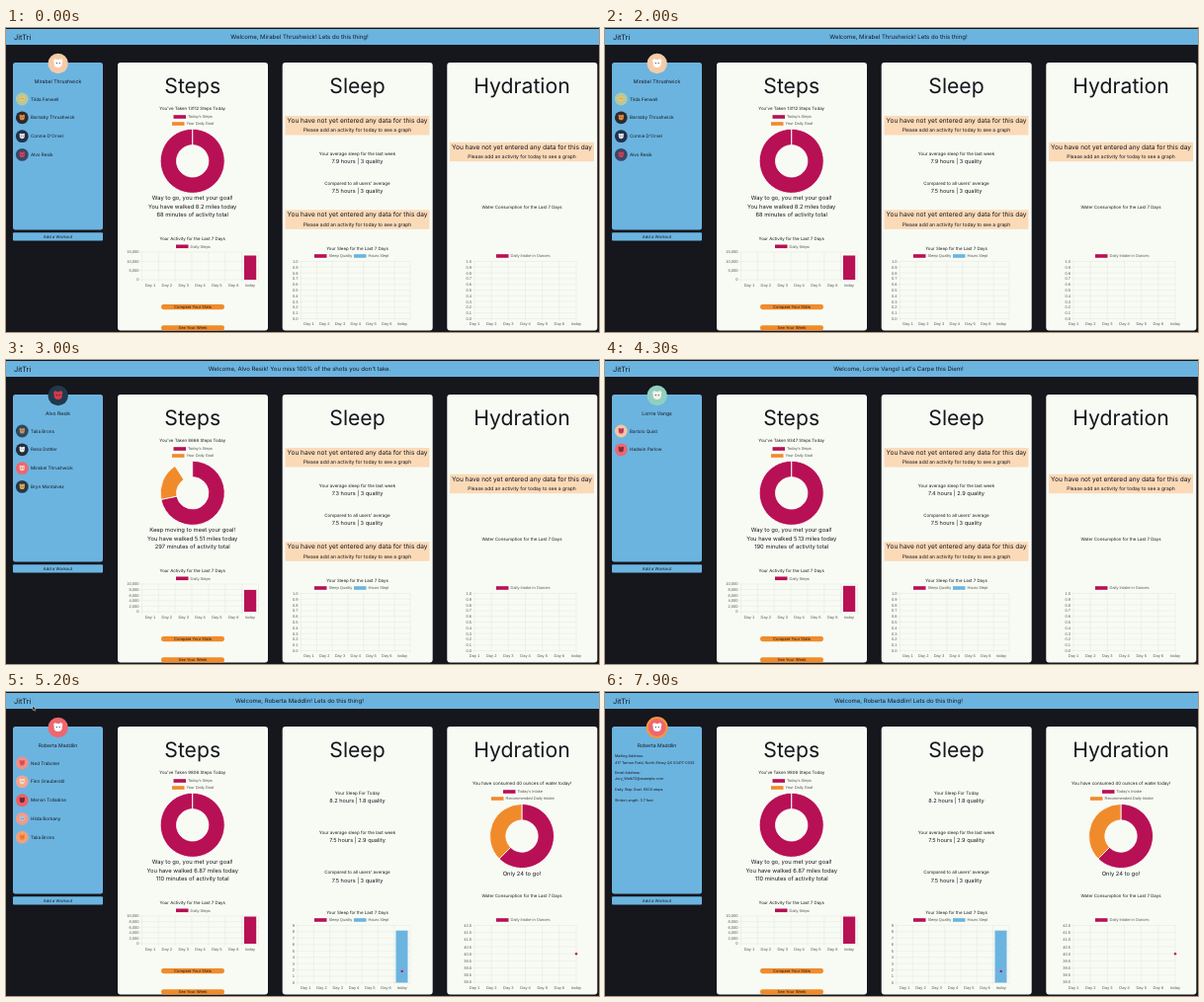
An HTML page that plays this animation: 600x308 px, repeating every 8000 ms.

```html
<!DOCTYPE html>
<html lang="en">
<head>
<meta charset="utf-8">
<title>Activity dashboard</title>
<style>
  html, body { margin: 0; width: 100%; height: 100%; overflow: hidden; background: #16161d; }
  svg { display: block; width: 100vw; height: 100vh; }
  text { font-family: Inter, Roboto, sans-serif; fill: #16161d; text-rendering: geometricPrecision; white-space: pre; }
  .chart { font-family: "Liberation Sans", Arial, sans-serif; fill: #555; }
</style>
</head>
<body>
<svg id="stage" viewBox="0 0 600 308"></svg>
<script>
const LOOP = 8000, CHART_MS = 1000;
const BLUE = '#6bb4e0', PINK = '#b81055', ORANGE = '#f08b2b', PAPER = '#f8fbf4',
      PEACH = '#fbdab8', GRID = '#e3e6df', DARK = '#16161d', CORAL = '#ef6670';
const DAYS = ['Day 1', 'Day 2', 'Day 3', 'Day 4', 'Day 5', 'Day 6', 'today'];
const NO_DATA = 'You have not yet entered any data for this day';
const ADD_DATA = 'Please add an activity for today to see a graph';
const PRAISE = 'Way to go, you met your goal!';

const users = [
  { at: -CHART_MS, name: 'Mirabel Thrushwick', quote: 'Lets do this thing!', face: ['#f5cba8', '#fff'],
    friends: [['Tilda Fenwell', '#b5c9a0', '#e9c46a'], ['Barnaby Thrushwick', '#2b2a30', '#e08a3c'],
              ["Connie D'Orvel", '#22304a', '#d8dfe8'], ['Alvo Resik', '#3a4766', '#d0405c']],
    steps: 13112, top: 15000, tick: 5000, share: 1, note: PRAISE, miles: '8.2', mins: 68, week: '7.9 hours | 3 quality' },
  { at: 2550, name: 'Alvo Resik', quote: "You miss 100% of the shots you don't take.", face: ['#21394c', '#d23b4c'],
    friends: [['Talia Brons', '#2c4a5e', '#c98d62'], ['Rena Dottler', '#23303e', '#f0f0ee'],
              ['Mirabel Thrushwick', CORAL, '#f8c9b4'], ['Bryn Montalvez', '#263848', '#e0a84c']],
    steps: 8666, top: 10000, tick: 2000, share: .79, note: 'Keep moving to meet your goal!', miles: '5.51', mins: 297, week: '7.3 hours | 3 quality' },
  { at: 3400, name: 'Lorrie Vangs', quote: "Let's Carpe this Diem!", face: ['#8fd0c2', '#f6f1e6'],
    friends: [['Bartolo Quist', '#f3c5a4', '#c23a5c'], ['Hadwin Parlow', CORAL, '#7f3142']],
    steps: 9347, top: 10000, tick: 2000, share: 1, note: PRAISE, miles: '5.13', mins: 190, week: '7.4 hours | 2.9 quality' },
  { at: 4350, name: 'Roberta Maddlin', quote: 'Lets do this thing!', face: [CORAL, '#fff'],
    friends: [['Ned Trabolen', '#f08f88', '#d9575f'], ['Finn Grauberstil', '#f3a58f', '#f7d9c9'],
              ['Mervin Tolladine', '#ee5f66', '#6d2b38'], ['Hilda Borkany', '#f29a8c', '#b9c0c9'],
              ['Talia Brons', '#f2a07c', '#f0862c']],
    steps: 9806, top: 10000, tick: 2000, share: 1, note: PRAISE, miles: '6.87', mins: 110, week: '7.5 hours | 2.9 quality', logged: true },
];
const HOVER_AT = 7200, PROFILE_AT = 7300;
const profile = [[65, 'Mailing Address:'], [72, '417 Tarrow Field, North Elmsy QX 00417-0032'],
  [82, 'Email Address:'], [88, 'Jory_Welk72@example.com'],
  [99, 'Daily Step Goal: 9000 steps'], [110, 'Stride Length: 3.7 feet']];

// pointer keys: time, x, y
const path = [[4900, 27, 14], [5300, 27, 14], [6100, 58, 186], [6900, 58, 186], [HOVER_AT, 54, 40]];

const rect = (x, y, w, h, fill, r = 0) =>
  `<rect x="${x}" y="${y}" width="${w}" height="${h}" rx="${r}" fill="${fill}"/>`;
const dot = (x, y, r, fill) => `<circle cx="${x}" cy="${y}" r="${r}" fill="${fill}"/>`;
const text = (s, x, y, size, anchor = 'middle', cls = '') =>
  `<text x="${x}" y="${y + size * .36}" font-size="${size}" text-anchor="${anchor}" class="${cls}">${s}</text>`;
const label = (s, x, y, anchor) => text(s, x, y, 4, anchor, 'chart');
const key = (x, y, color, s) => rect(x, y - 1.8, 12.5, 3.6, color) + label(s, x + 14.5, y, 'start');
const easeOut = t => 1 - (1 - t) ** 4;
const clamp = t => Math.max(0, Math.min(1, t));

function alertBox(cx, y) {
  return rect(cx - 73, y, 146, 19.5, PEACH) + text(NO_DATA, cx, y + 4.8, 6.55) + text(ADD_DATA, cx, y + 14.6, 5);
}

function fact(title, value, y) {
  return text(title, 355.5, y, 4.5) + text(value, 355.5, y + 8.3, 5.6);
}

function avatar(x, y, r, [skin, mark]) {
  const s = r * .4;
  return dot(x, y, r, skin) + dot(x - s * .65, y - s * .7, s * .45, mark) +
    dot(x + s * .65, y - s * .7, s * .45, mark) + dot(x, y, s, mark) +
    dot(x - s * .35, y - s * .1, s * .14, DARK) + dot(x + s * .35, y - s * .1, s * .14, DARK);
}

function slice(cx, cy, from, to, color) {
  if (to - from < 1e-4) return '';
  const R = 32.5, r = 16.2, end = Math.min(to, from + .9999), big = end - from > .5 ? 1 : 0;
  const at = (k, rad) => {
    const a = k * 2 * Math.PI;
    return `${cx + rad * Math.sin(a)} ${cy - rad * Math.cos(a)}`;
  };
  return `<path d="M${at(from, R)}A${R} ${R} 0 ${big} 1 ${at(end, R)}L${at(end, r)}A${r} ${r} 0 ${big} 0 ${at(from, r)}Z"
    fill="${color}" stroke="#fff" stroke-width=".8"/>`;
}

const donut = (cx, cy, share, p) =>
  slice(cx, cy, 0, share * p, PINK) + slice(cx, cy, share * p, p, ORANGE);

// Grid with tick labels; line charts put the days on the grid lines.
function axes(x0, x1, y0, y1, ticks, onLines) {
  const n = DAYS.length, step = (x1 - x0) / (onLines ? n - 1 : n);
  let d = '', out = '';
  ticks.forEach((s, i) => {
    const y = y0 + (y1 - y0) * i / (ticks.length - 1);
    d += `M${x0 - 2} ${y}H${x1}`;
    out += label(s, x0 - 3, y, 'end');
  });
  for (let i = 0; i <= n - (onLines ? 1 : 0); i++) d += `M${x0 + i * step} ${y0}V${y1 + 2}`;
  DAYS.forEach((s, i) => out += label(s, x0 + step * (onLines ? i : i + .5), y1 + 5.2, 'middle'));
  return `<path d="${d}" stroke="${GRID}" stroke-width=".5" fill="none"/>` + out;
}

const scale = (top, step, count, digits) =>
  Array.from({ length: count }, (_, i) => (top - i * step).toFixed(digits));

function header(u) {
  return rect(0, 1, 600, 16, BLUE) + text('JitTri', 8, 9, 7.4, 'start') +
    text(`Welcome, ${u.name}! ${u.quote}`, 297, 9.3, 6);
}

function sidebar(u, t) {
  let out = rect(7, 35, 91, 169.5, BLUE, 2.5) + avatar(52.7, 36, 10.2, u.face);
  if (t >= HOVER_AT) out += `<circle cx="52.7" cy="36" r="10" fill="none" stroke="#f4983c" stroke-width="2"/>`;
  out += text(u.name, 52.5, 54, 5.1);
  if (t >= PROFILE_AT) profile.forEach(([y, s]) => out += text(s, 10, y, 3.7, 'start'));
  else u.friends.forEach(([name, ...look], i) => {
    const y = 72 + i * 18.8;
    out += avatar(16.3, y, 6.4, look) + text(name, 25, y, 4.6, 'start');
  });
  return out + rect(7, 207.3, 91, 8.2, BLUE, 1) + text('Add a Workout', 52.5, 211.6, 4.2);
}

function button(s, y) {
  return rect(157, y, 64, 5.2, ORANGE, 2.4) + text(s, 189, y + 2.6, 4);
}

function stepsPanel(u, p) {
  const count = u.top / u.tick + 1, h = 28 * u.steps / u.top * p;
  const ticks = Array.from({ length: count }, (_, i) => (u.top - i * u.tick).toLocaleString('en-US'));
  return text('Steps', 188.7, 58, 21.2) +
    text(`You've Taken ${u.steps} Steps Today`, 188.7, 81, 4.4) +
    key(169.5, 90, PINK, "Today's Steps") + key(168, 97, ORANGE, 'Your Daily Goal') +
    donut(188.7, 134.8, u.share, p) +
    text(u.note, 188.7, 172.3, 5.8) +
    text(`You have walked ${u.miles} miles today`, 188.7, 180.8, 5.8) +
    text(`${u.mins} minutes of activity total`, 188.7, 189.2, 5.8) +
    text('Your Activity for the Last 7 Days', 188.7, 213, 4.4) +
    key(172, 221.3, PINK, 'Daily Steps') +
    axes(137.5, 255.5, 227, 255, ticks) + rect(241, 255 - h, 12.2, h, PINK) +
    button('Compare Your Stats', 280) + button('See Your Week', 301.2);
}

function sleepPanel(u, p) {
  let out = text('Sleep', 355.5, 58, 21.2);
  const week = 'Your average sleep for the last week', all = "Compared to all users' average";
  if (u.logged) {
    const unit = 58 / 9, h = 8.2 * unit * p;
    out += fact('Your Sleep For Today', '8.2 hours | 1.8 quality', 102) +
      fact(week, u.week, 142) + fact(all, '7.5 hours | 3 quality', 182.3) +
      axes(295, 409, 236.5, 294.5, scale(9, 1, 10, 0)) +
      rect(394.5, 294.5 - h, 12, h, BLUE) + dot(400.7, 294.5 - 1.8 * unit * p, 1.2, PINK);
  } else {
    out += alertBox(355.5, 89) + fact(week, u.week, 127) +
      fact(all, '7.5 hours | 3 quality', 157) + alertBox(355.5, 184.3) +
      axes(298.5, 409, 236.5, 294.5, scale(1, .1, 11, 1));
  }
  return out + text('Your Sleep for the Last 7 Days', 355.5, 223, 4.4) +
    key(312, 231, PINK, 'Sleep Quality') + key(352, 231, BLUE, 'Hours Slept');
}

function waterPanel(u, p) {
  let out = text('Hydration', 522, 58, 21.2);
  if (u.logged) {
    out += text('You have consumed 40 ounces of water today!', 522, 92.3, 4.5) +
      key(503, 101, PINK, "Today's Intake") + key(491, 108, ORANGE, 'Recommended Daily Intake') +
      donut(522, 146, .625, p) + text('Only 24 to go!', 522, 184, 5.8) +
      axes(474, 577, 236.5, 294, scale(42, .5, 9, 1), true) +
      dot(577, 294 - 28.75 * p, 1.2, PINK);
  } else {
    out += alertBox(522, 115.7) + axes(474, 577, 236.5, 294.5, scale(1, .1, 11, 1), true);
  }
  return out + text('Water Consumption for the Last 7 Days', 522, u.logged ? 206.5 : 181, 4.4) +
    key(496, 231, PINK, 'Daily Intake in Ounces');
}

function pointer(t) {
  const i = path.findIndex(k => k[0] > t);
  if (i < 1) return '';
  const [t0, x0, y0] = path[i - 1], [t1, x1, y1] = path[i];
  const k = (t - t0) / (t1 - t0), e = k * k * (3 - 2 * k);
  return `<path transform="translate(${x0 + (x1 - x0) * e} ${y0 + (y1 - y0) * e})"
    d="M0 0V4.6L1.1 3.6L1.9 5.2L2.6 4.9L1.9 3.3H3.3Z" fill="#111" stroke="#fff" stroke-width=".4"/>`;
}

function draw(t) {
  const u = users.findLast(v => t >= v.at);
  const p = easeOut(clamp((t - u.at) / CHART_MS));
  return header(u) + sidebar(u, t) +
    [113, 279.7, 446.3].map(x => rect(x, 35, 152, 271.5, PAPER, 3)).join('') +
    stepsPanel(u, p) + sleepPanel(u, p) + waterPanel(u, p) + pointer(t);
}

const stage = document.getElementById('stage');
const start = performance.now();
let last = '';
function tick() {
  // The screen refreshes ten times a second.
  const t = Math.floor((performance.now() - start) % LOOP / 100) * 100;
  const next = draw(t);
  if (next !== last) stage.innerHTML = last = next;
  requestAnimationFrame(tick);
}
tick();
</script>
</body>
</html>
```
